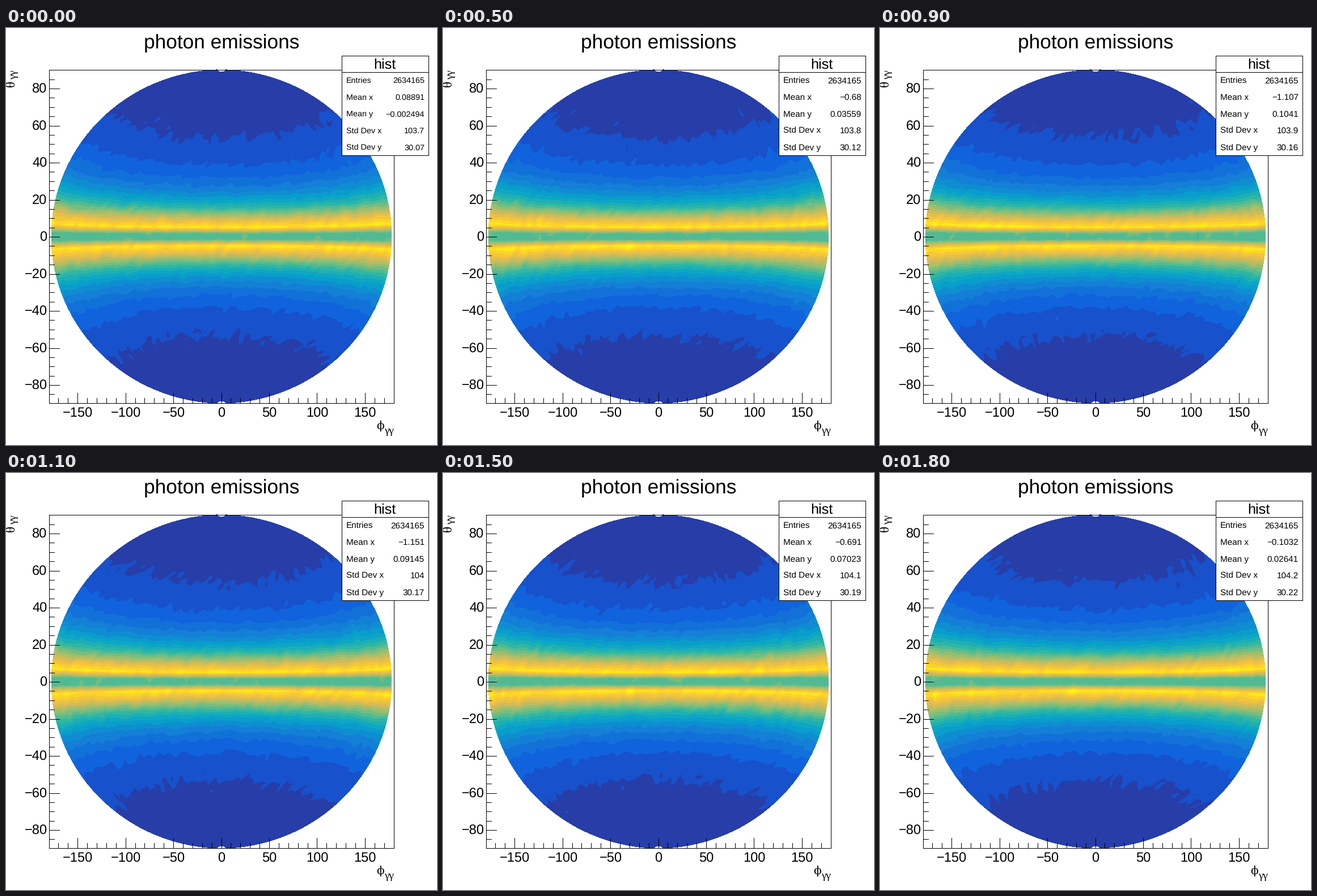
A matplotlib script that plays this animation: 760 by 737 pixels, repeating every 1900 ms.

```python
import numpy as np
import matplotlib.pyplot as plt
from matplotlib.animation import FuncAnimation
from matplotlib.colors import LinearSegmentedColormap
from matplotlib.patches import Rectangle
from matplotlib.tri import Triangulation

W, H, DPI = 760, 737, 100
FRAMES, STEP = 19, 100
LEFT, RIGHT, TOP, BOTTOM = 76, 684, 73.7, 662.9
CX, CY = 380, 368.5
SX, SY = 608 / 360, 589.6 / 180
PX = 72 / DPI
SANS, SERIF = "Liberation Sans", "Liberation Serif"

plt.rcParams["text.hinting"] = "none"
fig = plt.figure(figsize=(W / DPI, H / DPI), dpi=DPI, facecolor="white")
ax = fig.add_axes([0, 0, 1, 1])
ax.set_xlim(0, W)
ax.set_ylim(H, 0)
ax.axis("off")


def label(x, y, s, size, ha="left", font=SANS, **kw):
    return ax.text(x, y, s, fontsize=size * PX, ha=ha, va="baseline",
                   family=font, color="black", zorder=7, **kw)


def line(xs, ys, z=4):
    # The offsets make each line fall on the pixel that holds its coordinate.
    ax.plot(np.array(xs) - .45, np.array(ys) + .55, color="black", lw=PX,
            antialiased=False, zorder=z, solid_capstyle="butt")


def outline(x0, y0, x1, y1, z=4):
    line([x0, x1, x1, x0, x0], [y0, y0, y1, y1, y0], z)


def minus(s):
    return s.replace("-", "\u2212")


# Colour bands
STOPS = "#352a87 #0f5cdd #1480d6 #06a4ca #2eb7a4 #87bf77 #d1bb59 #fec832 #f9fb0e"
BANDS = 20
cmap = LinearSegmentedColormap.from_list("bands", STOPS.split(), N=255)
colors = [cmap(int((k + .99) * 255 / BANDS)) for k in range(BANDS)]
levels = np.linspace(0, 1, BANDS + 1)
levels[0], levels[-1] = -1, 2

# Bin centres on a sphere, projected to an ellipse, each cell cut along one diagonal
N = 60
centres = (np.arange(N) + .5) / N - .5
lon, lat = np.meshgrid(360 * centres, 180 * centres)
a, b = np.radians(lon / 2), np.radians(lat)
denom = np.sqrt(1 + np.cos(b) * np.cos(a))
px = CX + SX * 180 * np.cos(b) * np.sin(a) / denom
py = CY - SY * 90 * np.sin(b) / denom
idx = np.arange(N * N).reshape(N, N)
p, q, r, s = (c.ravel() for c in (idx[:-1, :-1], idx[:-1, 1:], idx[1:, 1:], idx[1:, :-1]))
cells = np.vstack([np.column_stack([p, q, r]), np.column_stack([p, r, s])])
mesh = Triangulation(px.ravel(), py.ravel(), cells)

# Intensity falls off with latitude and dips at the equator; noise is that of counts
mean = 1 / (1 + (np.abs(lat) / 13.2) ** 2.25)
mean[np.abs(lat) < 3] = .53
sigma = .022 * np.sqrt(mean / np.cos(b))

# Frame and ticks
outline(LEFT, TOP, RIGHT, BOTTOM)
for v in range(-170, 180, 10):
    x, major = CX + SX * v, v % 50 == 0
    line([x, x], [BOTTOM, BOTTOM - (18 if major else 9)])
    if major:
        label(x, 688, minus(str(v)), 23.6, "center")
for v in range(-85, 90, 5):
    y, major = CY - SY * v, v % 20 == 0
    line([LEFT, LEFT + (18 if major else 9)], [y, y])
    if major:
        label(72.5, y + 8.7, minus(str(v)), 23.6, "right")

label(CX, 35.5, "photon emissions", 35.2, "center")
label(653, 708.5, "ϕ", 20, font="DejaVu Serif")
label(667, 716.5, "γγ", 19, font=SERIF)
upright = dict(font=SERIF, rotation=90, rotation_mode="anchor")
label(15, 103.5, "θ", 23, **upright)
label(18, 91, "γγ", 19, **upright)

# Statistics box
ax.add_patch(Rectangle((592, 48), 153, 177, fc="white", ec="none", zorder=5))
outline(592, 48, 745, 224, 6)
line([592, 745], [77, 77], 6)
label(668, 71.5, "hist", 25.3, "center")
rows = [92 + 29.6 * k for k in range(5)]
names = [label(600, y, n, 15) for y, n in
         zip(rows, ["Entries", "Mean x", "Mean y", "Std Dev x", "Std Dev y"])]
values = [label(738, y, "", 15, "right") for y in rows]

# Key points of the two wandering means
KEYS = [0, 2, 5, 9, 11, 15, 18]
MEAN_X = [.08891, -.3028, -.68, -1.107, -1.151, -.691, -.1032]
MEAN_Y = [-.002494, .003964, .03559, .1041, .09145, .07023, .02641]


def stats(i):
    numbers = [
        np.interp(i, KEYS, MEAN_X),
        np.interp(i, KEYS, MEAN_Y),
        103.68 + .029 * i,
        30.0665 + .0083 * i + .0145 * np.sin(np.pi * i / 18) ** 2,
    ]
    return ["2634165"] + [minus(f"{n:.4g}") for n in numbers]


bands = []


def update(i):
    while bands:
        bands.pop().remove()
    rng = np.random.default_rng(100 + i)
    z = mean + sigma * rng.standard_normal(mean.shape)
    bands.append(ax.tricontourf(mesh, z.ravel(), levels=levels, colors=colors,
                                antialiased=False, zorder=2))

    texts = stats(i)
    size = 14.4 if max(map(len, texts)) > 8 else 15.2
    for y, name, value, text in zip(rows, names, values, texts):
        value.set_text(text)
        for t in (name, value):
            t.set_fontsize(size * PX)
            t.set_y(y + .36 * size)
    return names + values


anim = FuncAnimation(fig, update, frames=FRAMES, interval=STEP,
                     init_func=lambda: [], repeat=True, repeat_delay=0, blit=False)
plt.show()
```
